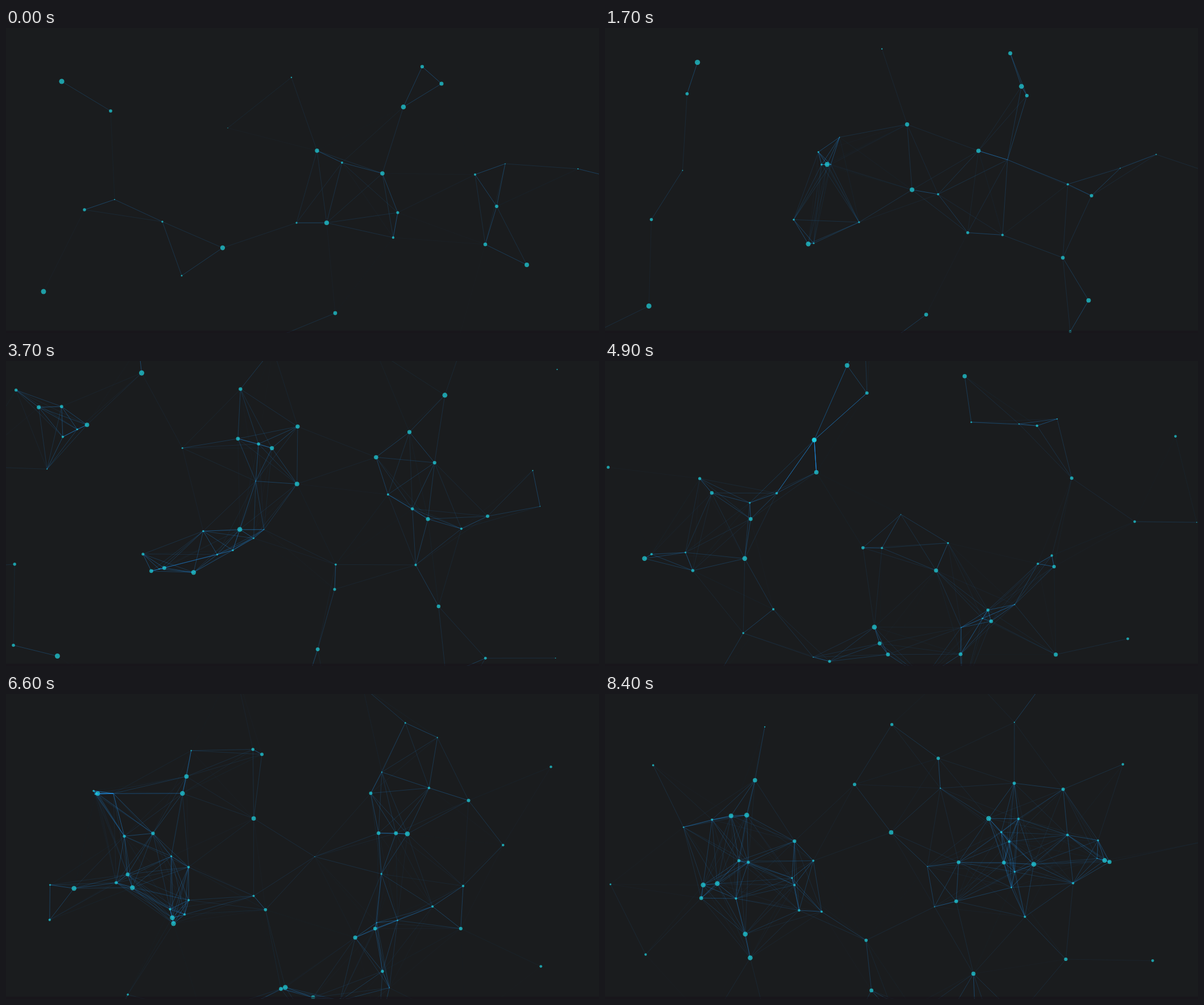
Write an HTML page with a canvas that moves like this. It is 1043x537 px and loops after 8500 ms.

```html
<!DOCTYPE html>
<html lang="en">
<head>
<meta charset="utf-8">
<title>Particle network</title>
<style>
  html, body { margin: 0; width: 100%; height: 100%; overflow: hidden; background: #1a1c1e; }
  canvas { display: block; }
</style>
</head>
<body>
<canvas id="stage" width="1043" height="537"></canvas>
<script>
const ctx = document.getElementById('stage').getContext('2d');
const W = 1043, H = 537;
const LOOP = 8500, STEP = 100;
const CUT = 47, SKIP = 49;              // the scene leaps ahead here
const REACH = 174, LINK = 0.48, GRAB = 0.8;
const MIN_R = 0.7, MAX_R = 4.6;
const STRAYS = 14;

const mix = (a, b, k) => a + (b - a) * k;
const smooth = k => k * k * (3 - 2 * k);
const rad = deg => deg * Math.PI / 180;

let seed = 7;
function random() {
  seed = (seed * 16807) % 2147483647;
  return seed / 2147483647;
}

// Opening layout, smallest to largest: x, y, velocity x, velocity y
const opening = [
  [390, 176, 1.33, 0.96], [878, 239, 1.66, 0.46], [191, 302, -3.21, -3.02],
  [1006, 248, -2.15, -1.49], [502, 87, -0.88, -2.95], [1075, 265, 1.2, 0],
  [309, 436, 3.42, -3.35], [511, 343, -3.77, -0.06], [275, 341, 3.35, -0.21],
  [591, 237, -0.3, 3.28], [825, 258, -0.65, 1.01], [681, 369, 1.07, -0.27],
  [472, 546, 1.6, 0.4], [797, 544, 1.25, -0.56], [689, 325, -3, 2.08],
  [138, 320, -3.32, 1.02], [184, 146, -2.33, -1.78], [863, 314, -0.43, -1.1],
  [732, 68, 0.59, 3], [843, 381, -2.22, 1.38], [579, 502, -0.83, 0.15],
  [766, 98, -3.13, -3.15], [547, 216, -0.92, -2.72], [662, 256, -0.3, -2.34],
  [916, 417, -3.85, 3.68], [564, 343, -1.41, -3.42], [381, 387, -1.38, -0.4],
  [699, 139, 1.97, -2.13], [66, 464, 0.66, 1.5], [98, 94, 3.8, -1.97]
];

// Clicks that each release a fan of particles
const clicks = [
  { at: 13.4, x: 387, y: 230, bearing: 45 },
  { at: 18.8, x: 727, y: 207, bearing: 78 },
  { at: 23.3, x: 442, y: 105, bearing: 62 },
  { at: 26.5, x: 103, y: 98, bearing: 20 },
  { at: 31.8, x: 261, y: 353, bearing: 33 },
  { at: 98, x: 368, y: 139, bearing: 148 },
  { at: 103.8, x: 676, y: 213, bearing: 48 },
  { at: 109.3, x: 307, y: 385, bearing: 123 },
  { at: 114, x: 158, y: 173, bearing: 33 },
  { at: 121, x: 715, y: 212, bearing: 95 },
  { at: 128, x: 878, y: 278, bearing: 62 }
];
const fan = [
  { turn: 0, speed: 4 }, { turn: 25, speed: 3 }, { turn: 75, speed: 3.4 }, { turn: 180, speed: 4.6 }
];

// The pointer visits every click and a few places between
const trail = [
  ...clicks,
  { at: 17, x: 708, y: 232 },
  { at: 24, x: 429, y: 105 },
  { at: 133, x: W, y: 262 }
].sort((a, b) => a.at - b.at);

const particles = [];
function add(x, y, vx, vy, r, born = 0) {
  particles.push({ x, y, vx, vy, r, born });
}

opening.forEach((p, i) => add(...p, mix(MIN_R, MAX_R, i / (opening.length - 1))));

for (const { at, x, y, bearing } of clicks) {
  for (const { turn, speed } of fan) {
    const a = rad(bearing + turn);
    add(x, y, speed * Math.cos(a), speed * Math.sin(a), mix(MIN_R, MAX_R, random()), at);
  }
}

// Strays wait on an oval outside the stage and drift in
for (let i = 0; i < STRAYS; i++) {
  const a = rad(360 * (i + 0.5) / STRAYS);
  const heading = a + Math.PI + mix(-0.5, 0.5, random());
  const speed = mix(2.5, 4.5, random());
  add(W / 2 + 760 * Math.cos(a), H / 2 + 500 * Math.sin(a),
    speed * Math.cos(heading), speed * Math.sin(heading), mix(MIN_R, MAX_R, random()));
}

function pointer(s) {
  for (let i = 1; i < trail.length; i++) {
    const a = trail[i - 1], b = trail[i];
    if (s < a.at || s > b.at || b.at - a.at > 20) continue;
    const k = smooth((s - a.at) / (b.at - a.at));
    return { x: mix(a.x, b.x, k), y: mix(a.y, b.y, k) };
  }
  return null;
}

function link(a, b, strength) {
  const d = Math.hypot(a.x - b.x, a.y - b.y);
  if (d >= REACH) return;
  ctx.globalAlpha = strength * (1 - d / REACH);
  ctx.beginPath();
  ctx.moveTo(a.x, a.y);
  ctx.lineTo(b.x, b.y);
  ctx.stroke();
}

function draw(s) {
  ctx.globalAlpha = 1;
  ctx.fillStyle = '#1a1c1e';
  ctx.fillRect(0, 0, W, H);

  const live = particles.filter(p => p.born <= s).map(p => ({
    x: p.x + p.vx * (s - p.born),
    y: p.y + p.vy * (s - p.born),
    r: p.r
  }));

  ctx.strokeStyle = '#2196f3';
  ctx.lineWidth = 1;
  live.forEach((a, i) => {
    for (const b of live.slice(i + 1)) link(a, b, LINK);
  });

  ctx.globalAlpha = 0.68;
  ctx.fillStyle = '#20dce8';
  for (const p of live) {
    ctx.beginPath();
    ctx.arc(p.x, p.y, p.r, 0, Math.PI * 2);
    ctx.fill();
  }

  const hand = pointer(s);
  if (hand) for (const p of live) link(hand, p, GRAB);

  ctx.globalAlpha = 0.6;
  ctx.fillStyle = '#18131a';
  ctx.fillRect(0, 533, W, 4);
}

const start = performance.now();
function tick() {
  const step = Math.floor(((performance.now() - start) % LOOP) / STEP);
  draw(step < CUT ? step : step + SKIP);
  requestAnimationFrame(tick);
}
tick();
</script>
</body>
</html>
```
